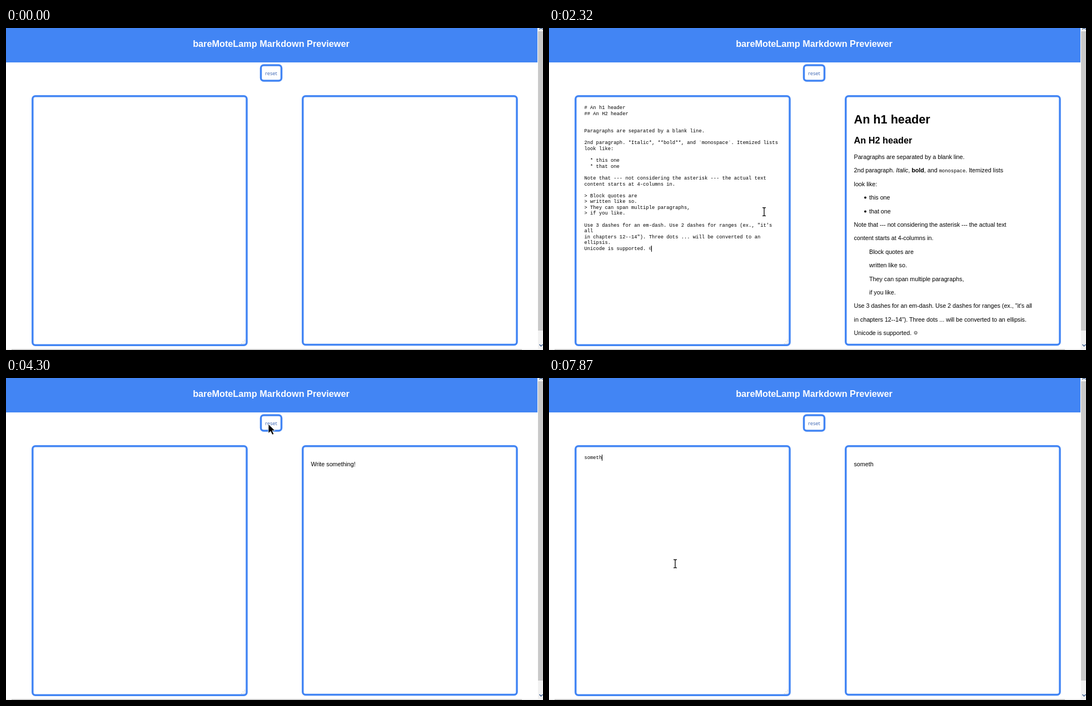
Write an HTML page that moves like this. It is 966 by 580 pixels and loops after 8000 ms.

```html
<!DOCTYPE html>
<html lang="en">
<head>
<meta charset="utf-8">
<title>Markdown Previewer</title>
<style>
html, body { margin: 0; width: 100%; height: 100%; overflow: hidden; background: #fff; }
svg { display: block; }
text { white-space: pre; font: 10.73px "Liberation Sans", Arial, sans-serif; }
.mono { font: 8.8px "Liberation Mono", "Courier New", monospace; }
.smile { font-family: "DejaVu Sans Mono", monospace; }
.title { font-size: 16.25px; font-weight: bold; fill: #fff; }
.h1 { font-size: 21.65px; font-weight: bold; }
.h2 { font-size: 16.25px; font-weight: bold; }
.reset { font: 9.3px "Open Sans", "Noto Sans", sans-serif; fill: #3c66b4; }
.frame { fill: #fff; stroke: #4285f4; stroke-width: 3.5; }
.line { fill: none; }
</style>
</head>
<body>
<svg width="966" height="580" viewBox="0 0 966 580">
  <rect width="956" height="62" fill="#4285f4"/>
  <text class="title" x="477" y="33.5" text-anchor="middle">bareMoteLamp Markdown Previewer</text>

  <rect class="frame" x="458.5" y="67" width="37" height="28" rx="5"/>
  <text class="reset" x="477" y="84.5" text-anchor="middle">reset</text>
  <rect class="frame" x="47.8" y="122.8" width="385.2" height="448.4" rx="5"/>
  <rect class="frame" x="533.8" y="122.8" width="385.2" height="447.6" rx="5"/>
  <path class="line" stroke="#a8a8a8" stroke-dasharray="1 2" d="M429 562.5h1M426 565.5h4M423 568.5h7"/>

  <rect x="957" width="9" height="580" fill="#f1f1f1"/>
  <rect x="957" y="6" width="9" height="539" fill="#c9c9c9"/>
  <path class="line" stroke="#36598f" stroke-width="1.4" d="M959.5 2.5l3-3 3 3M959.5 570l3 3 3-3"/>
  <rect y="578" width="957" height="2" fill="#f1f1f1"/>
  <rect x="10" y="578.5" width="918" height="1.5" fill="#c6c6c6"/>

  <g id="sample"></g>
  <path id="squiggle" class="line" stroke="#e03030" stroke-width=".9"/>
  <text id="typed" class="mono" x="63.5" y="146"></text>
  <text id="preview" x="548.5" y="159"></text>
  <rect id="caret" width="1" height="11"/>
  <path id="beam" class="line" stroke="#000" stroke-width="1.3" d="M-3-7.3h2.2l.8.8.8-.8H3M0-6.5v13M-3 7.3h2.2l.8-.8.8.8H3"/>
  <path id="arrow" stroke="#fff" stroke-width=".8" d="M0 0v16.5l4-3.6 3 6.3 2.8-1.3-2.9-6.1H12z"/>
</svg>
<script>
const LOOP = 8000, BLINK = 530, PASTE = 2230, RESET = 4300, TYPE = 7080;
const LEFT = 63.5, CHAR = 5.28, ROW = 10.58;
const $ = id => document.getElementById(id);

const markdown = `# An h1 header
## An H2 header


Paragraphs are separated by a blank line.

2nd paragraph. *Italic*, **bold**, and \`monospace\`. Itemized lists
look like:

  * this one
  * that one

Note that --- not considering the asterisk --- the actual text
content starts at 4-columns in.

&gt; Block quotes are
&gt; written like so.
&gt; They can span multiple paragraphs,
&gt; if you like.

Use 3 dashes for an em-dash. Use 2 dashes for ranges (ex., "it's
all
in chapters 12--14"). Three dots ... will be converted to an
ellipsis.
Unicode is supported. <tspan class="smile">☺</tspan>`;

// A leading tab marks an indented line, "•" a list item.
const rendered = `Paragraphs are separated by a blank line.
2nd paragraph. <tspan font-style="italic">Italic</tspan>, <tspan font-weight="bold">bold</tspan>, and <tspan class="mono">monospace</tspan>. Itemized lists
look like:
•this one
•that one
Note that --- not considering the asterisk --- the actual text
content starts at 4-columns in.
\tBlock quotes are
\twritten like so.
\tThey can span multiple paragraphs,
\tif you like.
Use 3 dashes for an em-dash. Use 2 dashes for ranges (ex., "it's all
in chapters 12--14"). Three dots ... will be converted to an ellipsis.
Unicode is supported. <tspan class="smile" x="656.5">☺</tspan>`;

const label = (x, y, text, cls = '') => `<text class="${cls}" x="${x}" y="${y}">${text}</text>`;

$('sample').innerHTML =
  markdown.split('\n').map((line, i) => label(LEFT, 146 + i * ROW, line, 'mono')).join('') +
  label(548.5, 172, 'An h1 header', 'h1') +
  label(548.5, 208, 'An H2 header', 'h2') +
  rendered.split('\n').map((line, i) => {
    const y = Math.round(236 + i * 24.4), bullet = line[0] === '•';
    const dot = bullet ? `<circle cx="569" cy="${y - 3.5}" r="2"/>` : '';
    return dot + (bullet || line[0] === '\t' ? label(576, y, line.slice(1)) : label(548.5, y, line));
  }).join('');
$('squiggle').setAttribute('d', 'M274 210.5' + 'q1-2 2 0t2 0'.repeat(12));

// Pointer path: time, x, y
const path = [
  [70, 641, 513], [250, 560, 450], [420, 400, 345], [580, 239, 270], [670, 264, 279],
  [1330, 264, 279], [1540, 383, 276], [1690, 384, 280], [1900, 389, 312], [2080, 387, 331],
  [2650, 387, 331], [2770, 404, 330], [2920, 412, 312], [3180, 440, 200], [3440, 455, 67],
  [3690, 459, 86], [3770, 463, 86], [4050, 472, 83], [4560, 472, 83], [4750, 425, 105],
  [4950, 320, 160], [5140, 264, 184], [5300, 264, 184], [5600, 246, 300], [5850, 225, 401],
  [6000, 223, 372], [6230, 227, 334.5], [LOOP, 227, 334.5]
];

// Times at which each letter of the word is typed
const keys = [TYPE, 7240, 7390, 7560, 7800, 7870];

function pointer(t) {
  const i = path.findIndex(p => p[0] > t);
  const [t0, x0, y0] = path[i - 1], [t1, x1, y1] = path[i];
  const k = (t - t0) / (t1 - t0);
  return [x0 + (x1 - x0) * k, y0 + (y1 - y0) * k];
}

const show = (id, on) => $(id).style.display = on ? '' : 'none';
const move = (id, x, y) => $(id).setAttribute('transform', `translate(${x} ${y})`);

function draw(t) {
  const pasted = t >= PASTE && t < RESET;
  const count = keys.filter(k => t >= k).length;
  const word = 'someth'.slice(0, count);
  show('sample', pasted);
  show('squiggle', pasted && t >= 2460);
  $('typed').textContent = word;
  $('preview').textContent = word || (t >= RESET ? 'Write something!' : '');

  // The caret blinks from the last click or paste and stays lit while typing.
  const since = [5160, PASTE, 1320].find(s => t >= s);
  const focused = since && !(t >= RESET && t < 5160);
  show('caret', focused && (count || Math.floor((t - since) / BLINK) % 2 === 0));
  move('caret', Math.floor(LEFT + CHAR * (pasted ? 23 : count)), pasted ? 392 : 138);

  const visible = t >= 70;
  const [x, y] = visible ? pointer(t) : [0, 0];
  const overInput = x > 46 && x < 435 && y > 121 && y < 573;
  show('beam', visible && overInput);
  show('arrow', visible && !overInput);
  move('beam', x, y);
  move('arrow', x, y);
}

(function tick() {
  draw(performance.now() % LOOP);
  requestAnimationFrame(tick);
})();
</script>
</body>
</html>
```
